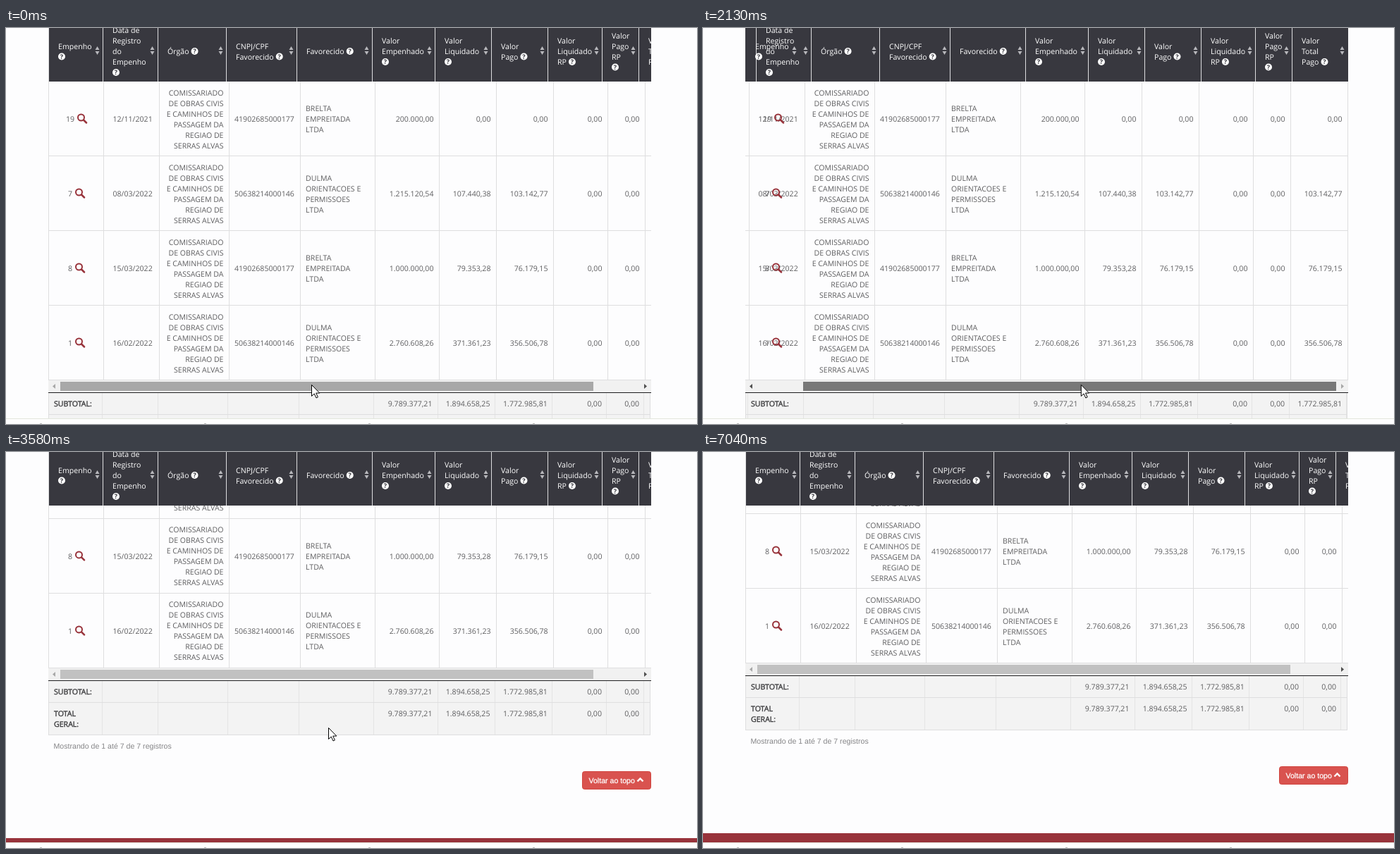
An HTML page that plays this animation: 980x562 px, repeating every 7.79 s.

```html
<!DOCTYPE html>
<html lang="pt-BR">
<head>
<meta charset="utf-8">
<title>Tabela de empenhos</title>
<style>
html, body { margin: 0; width: 100%; height: 100%; overflow: hidden; background: #fdfdfe; }
svg { display: block; width: 980px; height: 562px; }
text { font: 10.6px "Open Sans", "Noto Sans", sans-serif; fill: #5e5e60; white-space: pre; text-rendering: geometricPrecision; }
.head text { fill: #fff; }
.head .mark { fill: #38383f; font-weight: 700; font-size: 9px; }
.label { fill: #3a3a3c; stroke: #3a3a3c; stroke-width: .35px; }
.sans { font: 10.6px "Liberation Sans", Arial, sans-serif; }
.info { fill: #858587; }
.button { fill: #fff; stroke: #fff; stroke-width: .25px; }
</style>
</head>
<body>
<script>
const LOOP = 7790, LEFT = 60, WIDTH = 855, TOP = 76, ROW = 106, LEADING = 15;
const SCROLL_BODY = 73, SCROLL_HEAD = 62, SCROLL_THUMB = 65;
const LINE = '#dededf', PALE = '#f3f3f3', DARK = '#38383f', RED = '#98333b';

// header width, body width, title (a trailing bar puts the help icon on its own line)
const columns = [
  [77, 78, 'Empenho|'],
  [78, 79, 'Data de|Registro|do|Empenho|'],
  [97, 99, 'Órgão'],
  [100, 101, 'CNPJ/CPF|Favorecido'],
  [107, 106, 'Favorecido'],
  [89, 91, 'Valor|Empenhado|'],
  [80, 81, 'Valor|Liquidado|'],
  [80, 81, 'Valor|Pago'],
  [77, 77, 'Valor|Liquidado|RP'],
  [52, 53, 'Valor|Pago|RP|'],
  [79, 81, 'Valor|Total|Pago']
];
const edges = k => columns.reduce((xs, c) => [...xs, xs[xs.length - 1] + c[k]], [LEFT]);
const headX = edges(0), bodyX = edges(1);

const agency = 'COMISSARIADO|DE OBRAS CIVIS|E CAMINHOS DE|PASSAGEM DA|REGIAO DE|SERRAS ALVAS';
const firmA = ['41902685000177', 'BRELTA|EMPREITADA|LTDA'];
const firmB = ['50638214000146', 'DULMA|ORIENTACOES E|PERMISSOES|LTDA'];
const rows = [
  ['19', '12/11/2021', firmA, '200.000,00 0,00 0,00 0,00 0,00 0,00'],
  ['7', '08/03/2022', firmB, '1.215.120,54 107.440,38 103.142,77 0,00 0,00 103.142,77'],
  ['8', '15/03/2022', firmA, '1.000.000,00 79.353,28 76.179,15 0,00 0,00 76.179,15'],
  ['1', '16/02/2022', firmB, '2.760.608,26 371.361,23 356.506,78 0,00 0,00 356.506,78']
];
const totals = '9.789.377,21 1.894.658,25 1.772.985,81 0,00 0,00 1.772.985,81';

const GRAB = 433, PRESS = 130, RELEASE = 2720, CIRCLE = [4900, 5690], GONE = 7040;
// time, x, y of the pointer tip
const pointer = [
  [PRESS, GRAB, 506], [1000, 570, 506], [1750, 423, 506], [2180, 540, 506], [2670, 393, 506],
  [RELEASE, 393, 506], [3110, 457, 391], [4130, 457, 391], [4630, 167, 440],
  [CIRCLE[0], 90, 440], [CIRCLE[1], 90, 440], [6480, 822, 400], [7020, 895, 564]
];
const wheel = [[3130, 0], [3250, 59], [3330, 59], [3620, 200]];

const clamp = (v, max = 1) => Math.max(0, Math.min(max, v));
const span = (t, from, to) => clamp((t - from) / (to - from));

function at(keys, t, k) {
  const i = keys.findIndex(key => key[0] > t);
  if (i < 1) return keys[i ? keys.length - 1 : 0][k];
  const a = keys[i - 1], b = keys[i], u = span(t, a[0], b[0]);
  return a[k] + (b[k] - a[k]) * u * u * (3 - 2 * u);
}

function add(parent, tag, attrs = {}, content) {
  const node = document.createElementNS('http://www.w3.org/2000/svg', tag);
  for (const name in attrs) node.setAttribute(name, attrs[name]);
  if (content) node.textContent = content;
  return parent.appendChild(node);
}
const group = (p, attrs) => add(p, 'g', attrs);
const rect = (p, x, y, width, height, fill) => add(p, 'rect', { x, y, width, height, fill });
const path = (p, d, attrs) => add(p, 'path', { d, ...attrs });
const write = (p, x, y, str, attrs) => add(p, 'text', { x, y: y + 4, ...attrs }, str);
const right = { 'text-anchor': 'end' };
const move = (node, x, y) => node.setAttribute('transform', `translate(${x} ${y})`);
const show = (node, on) => node.setAttribute('visibility', on ? 'visible' : 'hidden');

// Lines centred on y; returns the last line's node and its centre
function lines(p, x, y, str, attrs) {
  const parts = str.split('|'), first = y - (parts.length - 1) * LEADING / 2;
  const nodes = parts.map((s, i) => write(p, x, first + i * LEADING, s, attrs));
  return [nodes.pop(), first + (parts.length - 1) * LEADING];
}
function values(y, str, inset) {
  str.split(' ').forEach((s, i) => write(body, bodyX[i + 6] - 7.5 - inset / (i + 1), y, s, right));
}
function clip(id, x, y, w, h) {
  rect(add(svg, 'clipPath', { id }), x, y, w, h);
  return { 'clip-path': `url(#${id})` };
}

const svg = add(document.body, 'svg', { viewBox: '0 0 980 562' });
rect(svg, 0, 0, 980, 562, '#fdfdfe');

// Page content, scrolled vertically
const page = group(group(svg, clip('view', 0, TOP, 980, 486)));
const hover = rect(page, LEFT, 0, WIDTH, ROW - 1, PALE);
const table = group(page, clip('table', LEFT, 0, WIDTH, 800));
rect(table, LEFT, 518, WIDTH - 1, 77, PALE);
const body = group(table), pinned = group(table);

bodyX.forEach(x => {
  rect(body, x, TOP, 1, 424, LINE);
  rect(body, x - 2, 518, 1, 76, '#e4e4e4');
});
rows.forEach(([id, date, [code, firm], sums], i) => {
  const mid = TOP + i * ROW + 53, x = 95 + id.length * 3;
  rect(table, LEFT, mid + 52, WIDTH, 1, LINE);
  write(body, 151.5, mid, date);
  lines(body, 308.5, mid, agency, right);
  write(body, 324, mid, code);
  lines(body, 425, mid, firm);
  values(mid, sums, 0);
  write(pinned, x - 4, mid, id, right);
  add(pinned, 'circle', { cx: x + 5.5, cy: mid - 2, r: 4.5, fill: 'none', stroke: RED, 'stroke-width': 2 });
  path(pinned, `M${x + 9} ${mid + 1.5}l4 4`, { stroke: RED, 'stroke-width': 2.5, 'stroke-linecap': 'round' });
});
values(533, totals, 2);
values(564, totals, 2);
lines(pinned, 68, 533, 'SUBTOTAL:', { class: 'label' });
lines(pinned, 68, 571.5, 'TOTAL|GERAL:', { class: 'label' });
[548, 594].forEach(y => rect(table, LEFT, y, WIDTH - 1, 1, LINE));
[LEFT, 913].forEach(x => rect(table, x, 518, 1, 77, LINE));

// Horizontal scroll bar
rect(page, LEFT, 500, WIDTH, 17, '#f1f1f1');
const thumb = rect(page, 77, 502, 756, 13);
const arrowL = path(page, 'M70 505v7l-4-3.5z');
const arrowR = path(page, 'M905 505v7l4-3.5z');
rect(page, LEFT, 517, WIDTH, 1, '#1c1c1e');

write(page, 67.5, 610, 'Mostrando de 1 até 7 de 7 registros', { class: 'sans info' });
add(page, 'rect', { x: 817.5, y: 646.5, width: 97, height: 25, rx: 3, fill: '#d9534f', stroke: '#d0443f' });
write(page, 826.5, 659, 'Voltar ao topo', { class: 'sans button' });
path(page, 'M895.5 660.5l4-4 4 4', { fill: 'none', stroke: '#fff', 'stroke-width': 2.4 });
rect(page, 0, 741, 980, 13, RED);

// Fixed bottom strip
rect(svg, 0, 554, 980, 8, '#fefefe');
rect(svg, 0, 554, 980, 1, '#e2e6dc');
for (let i = 0; i < 4; i++) rect(svg, 48 + 233 * i, 561, 3, 1, '#b8b8b8');

// Fixed header
const head = group(svg, { class: 'head', ...clip('head', LEFT, 0, WIDTH, TOP) });
rect(head, LEFT, 0, WIDTH, TOP, DARK);
const headMove = group(head), headPinned = group(head);
columns.forEach(([, , title], i) => {
  const p = i ? headMove : headPinned, x = headX[i] + 14, sortX = headX[i + 1] - 7.5;
  rect(headMove, headX[i], 0, 1, TOP, '#dedee0');
  const [last, iconY] = lines(p, x, 33, title);
  const iconX = x + (last.textContent ? last.getComputedTextLength() + 8 : 5);
  add(p, 'circle', { cx: iconX, cy: iconY, r: 5, fill: '#fff' });
  write(p, iconX, iconY - .7, '?', { class: 'mark', 'text-anchor': 'middle' });
  path(p, `M${sortX - 3} 31l3-5 3 5zM${sortX - 3} 33l3 5 3-5z`, { fill: '#b8b8bc' });
});

// Pointers
const arrow = path(svg, 'M.5 .5v16l3.7-3.5 2.8 6 2.4-1.1-2.7-5.8h5.1z', { fill: '#fff', stroke: '#000' });
const beam = path(svg, 'M-3.5-7.5h2.5l1 1 1-1h2.5M0-6.5v14M-3.5 8.5h2.5l1-1 1 1h2.5', { fill: 'none', stroke: '#111' });

function draw(t) {
  const turn = span(t, ...CIRCLE) * 2 * Math.PI;
  const x = at(pointer, t, 1) + 125 * (1 - Math.cos(turn));
  const y = at(pointer, t, 2) + 45 * Math.sin(turn);
  const scroll = at(wheel, t, 1), py = y + scroll;
  const pressed = t >= PRESS && t < RELEASE;
  const slide = pressed ? clamp((x - GRAB) / SCROLL_THUMB) : 0;
  const row = Math.floor((py - TOP) / ROW);
  const onRow = !pressed && row >= 0 && row < rows.length && x > LEFT && x < LEFT + WIDTH;
  const onBar = py >= 500 && py < 517 && x > 77 && x < 833;

  move(page, 0, -scroll);
  move(body, -SCROLL_BODY * slide, 0);
  move(headMove, -SCROLL_HEAD * slide, 0);
  move(thumb, SCROLL_THUMB * slide, 0);
  thumb.setAttribute('fill', pressed ? '#787878' : onBar ? '#a8a8a8' : '#c1c1c1');
  arrowL.setAttribute('fill', slide > 0 ? '#505050' : '#a8a8a8');
  arrowR.setAttribute('fill', slide < 1 ? '#505050' : '#a8a8a8');

  hover.setAttribute('y', TOP + row * ROW);
  show(hover, onRow);
  show(beam, onRow);
  show(arrow, !onRow && t < GONE);
  move(beam, x + .5, y + .5);
  move(arrow, x, y);
}

function tick() {
  draw(performance.now() % LOOP);
  requestAnimationFrame(tick);
}
tick();
</script>
</body>
</html>
```
